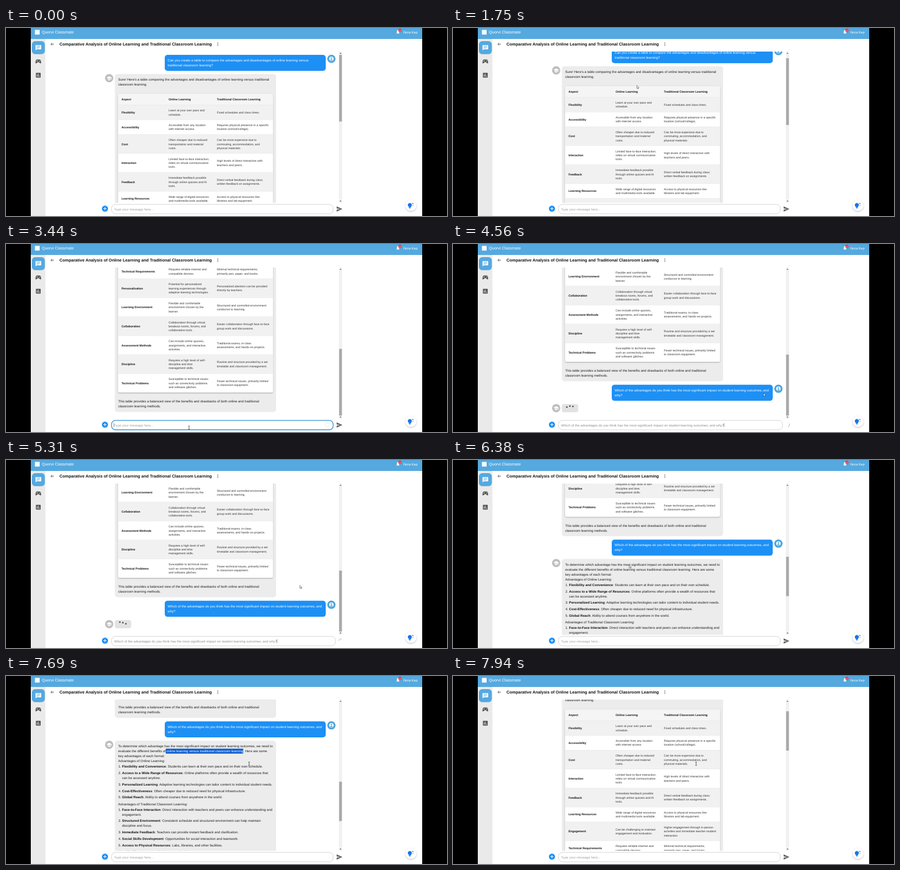
An HTML page that plays this animation: 800 by 343 pixels, repeating every 8000 ms.

```html
<!DOCTYPE html>
<html lang="en">
<head>
<meta charset="utf-8">
<title>Chat demo</title>
<style>
html, body { margin: 0; width: 100%; height: 100%; overflow: hidden; background: #000; }
svg { display: block; width: 100vw; height: 100vh; }
text { font-family: "Liberation Sans", Arial, sans-serif; font-size: 6.05px; fill: #1c1c1c;
  text-rendering: geometricPrecision; white-space: pre; }
.cell { font-size: 5.29px; fill: #333; }
.bold { font-weight: 700; fill: #111; }
.white { fill: #fff; }
</style>
</head>
<body>
<svg id="stage" viewBox="0 0 800 343" preserveAspectRatio="none"></svg>
<script>
const LOOP = 8000;
const BLUE = '#1d90f5', SKY = '#55a9df';
const QUESTION = 'Which of the advantages do you think has the most significant impact on student learning outcomes, and why?';

// time, scroll offset
const SCROLL = [[1630, 0], [1750, 13.7], [2420, 323], [4190, 323], [4310, 379], [5850, 379],
  [6380, 490], [6880, 739], [6980, 739], [7290, 555], [7690, 555], [7940, 60], [8000, 0]];
// time, x, y
const POINTER = [[60, 742, 4], [810, 524, 52], [880, 522, 52], [1570, 333.5, 104.5], [1750, 333.5, 104.5],
  [2440, 334, 232], [2690, 332, 326], [2880, 332, 326], [3130, 332, 335], [3700, 332, 335],
  [4060, 603, 329], [4250, 603, 329], [4800, 533, 228.5], [5780, 533, 228.5], [6250, 319.5, 191.5],
  [6900, 319.5, 191.5], [7340, 290, 135], [7600, 431, 135], [7680, 441, 160]];

const ROWS = [
  ['Flexibility', 'Learn at your own pace and|schedule.', 'Fixed schedules and class times.'],
  ['Accessibility', 'Accessible from any location|with internet access.', 'Requires physical presence in a specific|location (school/college).'],
  ['Cost', 'Often cheaper due to reduced|transportation and material|costs.', 'Can be more expensive due to|commuting, accommodation, and|physical materials.'],
  ['Interaction', 'Limited face-to-face interaction;|relies on virtual communication|tools.', 'High levels of direct interaction with|teachers and peers.'],
  ['Feedback', 'Immediate feedback possible|through online quizzes and AI|tools.', 'Direct verbal feedback during class;|written feedback on assignments.'],
  ['Learning Resources', 'Wide range of digital resources|and multimedia tools available.', 'Access to physical resources like|libraries and lab equipment.'],
  ['Engagement', 'Can be challenging to maintain|engagement and motivation.', 'Higher engagement through in-person|activities and immediate teacher-student|interaction.'],
  ['Technical Requirements', 'Requires reliable internet and|compatible devices.', 'Minimal technical requirements;|primarily pen, paper, and books.'],
  ['Personalization', 'Potential for personalized|learning experiences through|adaptive learning technologies.', 'Personalized attention can be provided|directly by teachers.'],
  ['Learning Environment', 'Flexible and comfortable|environment chosen by the|learner.', 'Structured and controlled environment|conducive to learning.'],
  ['Collaboration', 'Collaboration through virtual|breakout rooms, forums, and|collaborative tools.', 'Easier collaboration through face-to-face|group work and discussions.'],
  ['Assessment Methods', 'Can include online quizzes,|assignments, and interactive|activities.', 'Traditional exams, in-class|assessments, and hands-on projects.'],
  ['Discipline', 'Requires a high level of self-|discipline and time|management skills.', 'Routine and structure provided by a set|timetable and classroom management.'],
  ['Technical Problems', 'Susceptible to technical issues|such as connectivity problems|and software glitches.', 'Fewer technical issues, primarily limited|to classroom equipment.']
];

const PICK = 'evaluate the different benefits of online learning versus traditional classroom learning. Here are some';
// y, text; "#" starts a numbered item, ">" continues one
const REPLY = [
  [681, 'To determine which advantage has the most significant impact on student learning outcomes, we need to'],
  [690, PICK],
  [699, 'key advantages of each format:'],
  [708.3, 'Advantages of Online Learning:'],
  [718, '#1|Flexibility and Convenience|: Students can learn at their own pace and on their own schedule.'],
  [730, '#2|Access to a Wide Range of Resources|: Online platforms often provide a wealth of resources that'],
  [739, '>can be accessed anytime.'],
  [750.8, '#3|Personalized Learning|: Adaptive learning technologies can tailor content to individual student needs.'],
  [762.6, '#4|Cost-Effectiveness|: Often cheaper due to reduced need for physical infrastructure.'],
  [774.4, '#5|Global Reach|: Ability to attend courses from anywhere in the world.'],
  [786.7, 'Advantages of Traditional Classroom Learning:'],
  [796.6, '#1|Face-to-Face Interaction|: Direct interaction with teachers and peers can enhance understanding and'],
  [805.6, '>engagement.'],
  [817.2, '#2|Structured Environment|: Consistent schedule and structured environment can help maintain'],
  [826.2, '>discipline and focus.'],
  [838, '#3|Immediate Feedback|: Teachers can provide instant feedback and clarification.'],
  [850, '#4|Social Skills Development|: Opportunities for social interaction and teamwork.'],
  [862, '#5|Access to Physical Resources|: Labs, libraries, and other facilities.'],
  [874, 'Most Significant Impact on Student Learning Outcomes:'],
  [884, 'Among these advantages, personalized learning and face-to-face interaction have the most significant'],
  [893, 'impact on student learning outcomes:'],
  [905, '#1|Personalized Learning|: Content that adapts to the pace and needs of each student helps'],
  [914, '>close gaps in knowledge and keeps learners motivated.'],
  [926, '#2|Face-to-Face Interaction|: Direct contact with teachers and peers encourages discussion,'],
  [935, '>active participation, and a deeper understanding.'],
  [947, '#3|Immediate Feedback|: Quick answers let students correct mistakes early and build'],
  [956, '>confidence in their own skills.'],
  [968, 'Why these matter:'],
  [978, '#1|Engagement|: Students who feel supported are more likely to stay focused on their goals.'],
  [990, '#2|Retention|: Relevant content and active practice improve long-term memory.'],
  [1002, '#3|Motivation|: Visible progress encourages students to keep learning.'],
  [1014, 'In conclusion, the best outcomes often come from a blended approach that combines the flexibility of'],
  [1023, 'online learning with the direct support of the traditional classroom.']
];

const rect = (x, y, w, h, fill, r = 0, more = '') =>
  `<rect x="${x}" y="${y}" width="${w}" height="${h}" rx="${r}" fill="${fill}" ${more}/>`;
const disc = (x, y, r, fill, more = '') => `<circle cx="${x}" cy="${y}" r="${r}" fill="${fill}" ${more}/>`;
const path = (d, fill, more = '') => `<path d="${d}" fill="${fill}" ${more}/>`;
const label = (x, mid, s, cls = '', more = '') =>
  `<text x="${x}" y="${mid + 2.1}" class="${cls}" ${more}>${s}</text>`;
const cell = (x, mid, s, cls = '') => {
  const lines = s.split('|');
  return lines.map((l, i) => label(x, mid - .2 + (i - (lines.length - 1) / 2) * 7.35, l, 'cell ' + cls)).join('');
};
const group = (id, body, more = '') => `<g id="${id}" ${more}>${body}</g>`;

const userFace = y => disc(590.3, y, 7.5, '#4ea6dc') +
  `<g transform="translate(590.3 ${y})">` + disc(0, 0, 4, '#fff') + disc(0, -1.2, 1.35, '#4ea6dc') +
  path('M-2.6 2.3Q0 -.4 2.6 2.3Q0 4.2 -2.6 2.3Z', '#4ea6dc') + '</g>';
const botFace = y => disc(187.2, y, 7.5, '#bdbdbd') +
  `<g transform="translate(187.2 ${y})">` + path('M-4.8 -1L0 -3.6L4.8 -1L0 1.6Z', '#fff') +
  path('M-3 .9V2.6L0 4.2L3 2.6V.9L0 2.5Z', '#fff') + path('M4.1 -1h.7v3.6h-.7Z', '#fff') + '</g>';
const userSays = (y, a, b) => rect(288, y, 292, 29.3, BLUE, 5) +
  label(293.3, y + 9.8, a, 'white') + label(293.3, y + 18.7, b, 'white') + userFace(y + 7.3);

function table() {
  let y = 140.5, out = rect(203.3, 120.5, 281, 473.6, '#fff', 3, 'filter="url(#soft)"') +
    rect(203.3, 120.5, 281, 20, '#f5f5f5', 2.5);
  [[209.5, 'Aspect'], [295, 'Online Learning'], [382.6, 'Traditional Classroom Learning']]
    .forEach(([x, s]) => out += cell(x, 130.2, s, 'bold'));
  ROWS.forEach(([name, a, b], i) => {
    const tall = Math.max(a.split('|').length, b.split('|').length) > 2;
    const h = tall ? 34.6 : 26.9, mid = y + h / 2;
    if (i % 2 === 0) out += rect(203.3, y, 281, h, '#f1f1f1');
    out += rect(203.3, y - .2, 281, .4, '#dedede');
    out += cell(209.5, mid, name, 'bold') + cell(295, mid, a) + cell(382.6, mid, b);
    y += h;
  });
  return out;
}

function replyLine([y, s]) {
  if (s[0] === '>') return label(210.6, y, s.slice(1));
  if (s[0] !== '#') return label(203.5, y, s);
  const [n, head, rest] = s.slice(1).split('|');
  return label(204, y, n + '.') + label(210.6, y, `<tspan class="bold">${head}</tspan>${rest}`);
}

const chat = rect(197.5, 84, 292.5, 545.5, '#ececec', 5) + botFace(91.5) +
  userSays(49, 'Can you create a table to compare the advantages and disadvantages of online learning versus',
    'traditional classroom learning?') +
  label(203.5, 94, "Sure! Here's a table comparing the advantages and disadvantages of online learning versus traditional") +
  label(203.5, 103, 'classroom learning.') + table() +
  label(203.5, 610.3, 'This table provides a balanced view of the benefits and drawbacks of both online and traditional') +
  label(203.5, 619.3, 'classroom learning methods.') +
  group('sent', userSays(635.8, QUESTION.slice(0, -5), 'why?') + botFace(678.4)) +
  group('waiting', rect(197.5, 671, 29.7, 15, '#e2e2e2', 4) +
    [206.5, 212, 217.5].map(x => disc(x, 678.5, 1.5, '#555', 'class="dot"')).join('')) +
  group('reply', rect(197.5, 671, 292.5, 362, '#ececec', 5) + REPLY.map(replyLine).join('') +
    group('mark', rect(289.6, 685.6, 141, 9, '#0b5cd0') + label(203.5, 690, PICK, 'white'), 'clip-path="url(#pick)"'));

const sidebar = rect(45, 20, 26.5, 323, '#eaeaea') + rect(47, 24, 23.5, 23.7, SKY, 6) +
  path('M53.6 31.2h10.2v7.8h-8.2l-2 2Z', '#fff') +
  path('M55.4 33.2h6.6M55.4 35.1h6.6M55.4 37h4.6', 'none', `stroke="${SKY}" stroke-width=".8"`) +
  path('M56 57.6h5.2q1.5 0 1.9 1.6l.7 3.7q.1 1.7-1.3 1.7q-.8 0-2.4-2.2h-3q-1.6 2.2-2.4 2.2q-1.4 0-1.3-1.7l.7-3.7q.4-1.6 1.9-1.6Z', '#555') +
  path('M55.2 60.2h2.4M56.4 59v2.4', 'none', 'stroke="#eaeaea" stroke-width=".7"') +
  disc(60.4, 60.9, .6, '#eaeaea') + disc(61.7, 59.6, .6, '#eaeaea') +
  rect(54.2, 81.7, 8.8, 8.8, '#555', 1) +
  path('M56.3 84.6v4.2M58.6 83.4v5.4M60.9 86.6v2.2', 'none', 'stroke="#eaeaea" stroke-width="1"');

const header = rect(45, 0, 710, 20, SKY) + rect(52.5, 3.5, 8.5, 8.5, '#fff') +
  label(65, 8, 'Quorvi Classmate', 'white', 'style="font-size:7.3px"') +
  path('M708 9.8l.9-1V6.2q.2-2 2.1-2.4q1.9.4 2.1 2.4v2.6l.9 1ZM710.2 10.3h1.6q-.8 1.2-1.6 0Z', '#fff') +
  disc(714.6, 4.3, 3, '#e53935') + label(712.8, 3.7, '12', 'white', 'style="font-size:3.4px"') +
  label(721, 7.8, 'Nora Kep', 'white') +
  path('M87 29.5h-5.6M84 26.8l-2.7 2.7l2.7 2.7', 'none', 'stroke="#444" stroke-width=".8"') +
  label(97, 29.8, 'Comparative Analysis of Online Learning and Traditional Classroom Learning', 'bold', 'style="font-size:7.5px"') +
  [27, 29.5, 32].map(y => disc(384.3, y, .75, '#444')).join('');

const scrollbar = rect(603.8, 43, 6, 276, '#f1f1f1') + path('M605.2 47l1.6-2l1.6 2Z', '#555') +
  path('M605.2 315l1.6 2l1.6-2Z', '#555') + rect(604.3, 49, 5, 121, '#a9a9a9', 0, 'id="thumb"');

const footer = disc(179.5, 329.6, 5.6, BLUE) +
  path('M176.6 329.6h5.8M179.5 326.7v5.8', 'none', 'stroke="#fff" stroke-width="1"') +
  rect(191.5, 321.8, 402, 17.2, '#fff', 7, 'id="field" stroke="#c8c8c8" stroke-width=".8"') +
  label(196, 330.4, '', '', 'id="entry"') + rect(195.6, 327, .5, 7, '#222', 0, 'id="caret"') +
  disc(583, 329.5, 3.6, 'none', 'id="helper" stroke="#e3e3e3" stroke-width=".7"') +
  path('M599.8 325.6L610.3 330.3L599.8 335V331.4L606.6 330.3L599.8 329.2Z', '#606060', 'id="send"') +
  path('M603.5 330a3.5 3.5 0 0 1 5.6-2.8', 'none', 'id="spinner" stroke="#999" stroke-width=".7"') +
  disc(734.5, 324, 10, '#fff', 'filter="url(#soft)"') +
  path('M732.6 319.3a3.7 3.7 0 0 1 2.1 6.8v1.3h-4.2v-1.3a3.7 3.7 0 0 1 2.1-6.8ZM731 328h3.2v.9h-3.2Z', '#1976e8') +
  path('M738 318.4l.5 1.3l1.3.5l-1.3.5l-.5 1.3l-.5-1.3l-1.3-.5l1.3-.5ZM738.4 322.6l.3.8l.8.3l-.8.3l-.3.8l-.3-.8l-.8-.3l.8-.3Z', '#1976e8');

const pointer = group('arrow', path('M0 0V5.6L1.3 4.4L2.2 6.4L3.1 6L2.2 4.1H4Z', '#fff', 'stroke="#222" stroke-width=".5"')) +
  group('beam', path('M-1.4 -3H1.4M0 -3V3M-1.4 3H1.4', 'none', 'stroke="#222" stroke-width=".7"'));

document.getElementById('stage').innerHTML = `<defs>
  <filter id="soft" x="-20%" y="-20%" width="140%" height="140%"><feDropShadow dx="0" dy=".8" stdDeviation="1.2" flood-opacity=".35"/></filter>
  <clipPath id="view"><rect x="72" y="43" width="532" height="276"/></clipPath>
  <clipPath id="pick"><rect id="pickBox" x="289.6" y="685" width="0" height="10"/></clipPath></defs>` +
  rect(0, 0, 800, 343, '#000') + rect(45, 0, 710, 343, '#fff') + sidebar + header +
  `<g clip-path="url(#view)">${group('chat', chat)}</g>` + scrollbar + footer + group('pointer', pointer);

const $ = id => document.getElementById(id);
const show = (id, on) => { $(id).style.display = on ? '' : 'none'; };
const set = (id, attrs) => { for (const k in attrs) $(id).setAttribute(k, attrs[k]); };
const clamp = v => Math.min(1, Math.max(0, v));
const dots = [...document.querySelectorAll('.dot')];

function at(track, t) {
  const i = track.findIndex(k => k[0] > t);
  if (i < 0) return track[track.length - 1].slice(1);
  if (i === 0) return track[0].slice(1);
  const a = track[i - 1], b = track[i], p = (t - a[0]) / (b[0] - a[0]);
  return a.slice(1).map((v, j) => v + (b[j + 1] - v) * p);
}

function draw(t) {
  const sent = t >= 4190, replied = t >= 5810, waiting = sent && !replied;
  const focus = t >= 2880 && !sent;
  const [scroll] = at(SCROLL, t), [x, y] = at(POINTER, t);
  const height = replied ? 1015 : sent ? 655 : 599;

  set('chat', { transform: `translate(0 ${-scroll})` });
  set('thumb', { y: 49 + scroll / height * 264, height: 276 / height * 264 });
  show('sent', sent);
  show('waiting', waiting);
  show('reply', replied);
  dots.forEach((d, i) => d.setAttribute('cy', 676.6 - 1.9 * Math.cos((t - 5310) / 1000 * 2 * Math.PI - i * 1.15)));
  set('pickBox', { width: 141 * clamp((t - 7350) / 240) });

  const count = replied ? 0 : Math.round(QUESTION.length * clamp((t - 3500) / 400));
  const entry = $('entry');
  entry.textContent = count ? QUESTION.slice(0, count) : 'Type your message here...';
  entry.style.fill = !count ? '#a0a0a0' : waiting ? '#8c8c8c' : '#222';
  set('field', { width: waiting ? 406.3 : 402, stroke: focus ? '#2b8fd6' : '#c8c8c8', 'stroke-width': focus ? 1.3 : .8 });
  set('caret', { x: count ? 196 + entry.getComputedTextLength() : 195.6 });
  show('caret', focus || waiting);
  show('helper', focus);
  show('send', !waiting);
  show('spinner', waiting);
  set('spinner', { transform: `rotate(${(t - 5310) * .3} 607 330)` });

  const beam = (t >= 2660 && t < 3960) || t >= 7250;
  show('pointer', t >= 60);
  show('beam', beam);
  show('arrow', !beam);
  set('pointer', { transform: `translate(${x} ${y})` });
}

const start = performance.now();
function tick() {
  draw((performance.now() - start) % LOOP);
  requestAnimationFrame(tick);
}
draw(0);
requestAnimationFrame(tick);
</script>
</body>
</html>
```
